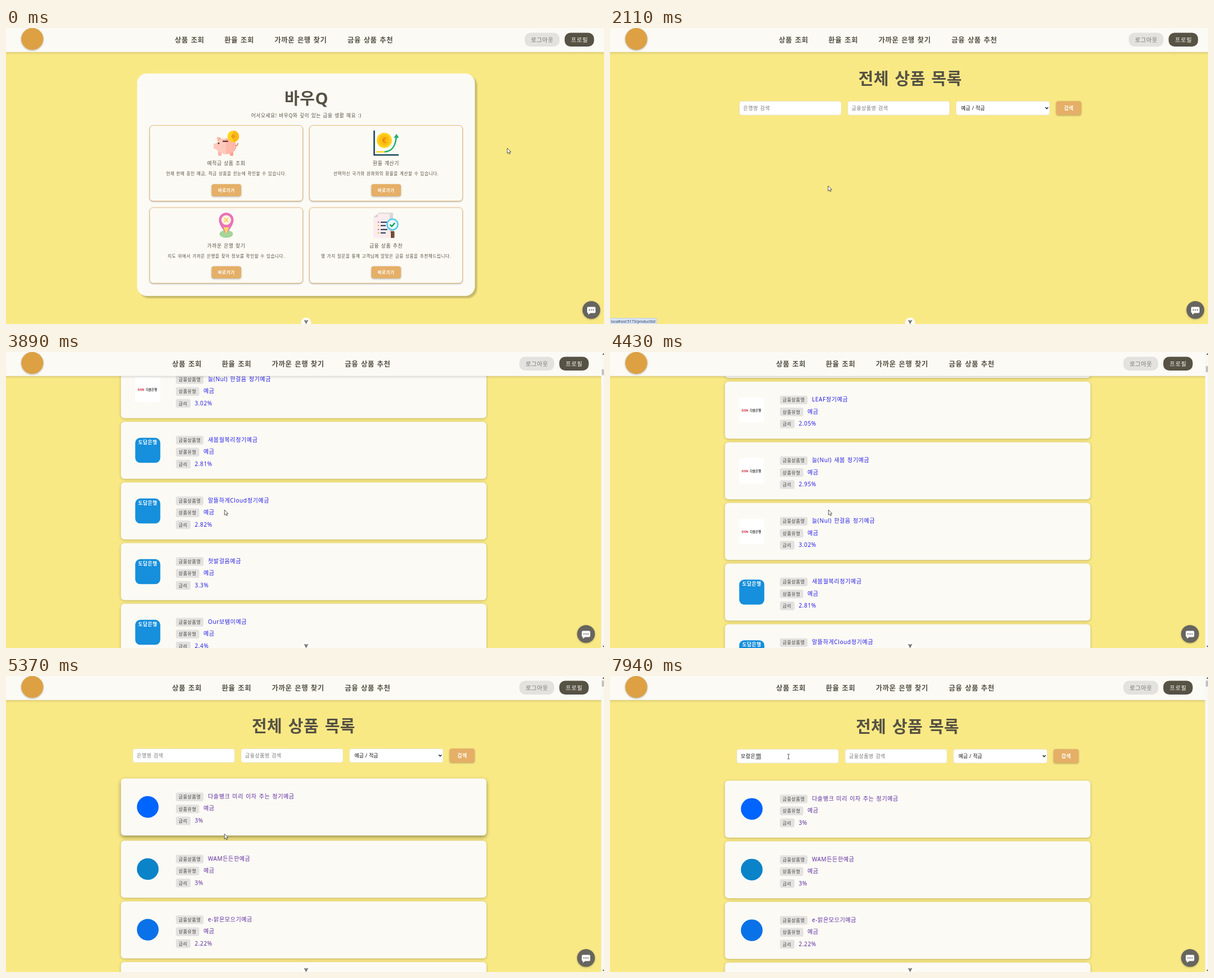
Write an HTML page that moves like this. It is 1063 px wide and 527 px high and loops after 8000 ms.

```html
<!DOCTYPE html>
<html lang="ko">
<head>
<meta charset="utf-8">
<title>금융 상품 조회</title>
<style>
  html, body { margin: 0; width: 100%; height: 100%; overflow: hidden; background: #f9e985; }
  svg { display: block; width: 100%; height: 100%; }
  text {
    font-family: "Noto Sans", "Noto Sans CJK KR", "Noto Sans CJK JP", sans-serif;
    letter-spacing: .55px; word-spacing: .08em; white-space: pre;
  }
  .tight { letter-spacing: 0; }
  .panel { filter: drop-shadow(4px 4.5px 1px rgba(0,0,0,.2)); }
  .box { filter: drop-shadow(0 1.6px 1.2px rgba(0,0,0,.3)); }
  .btn { filter: drop-shadow(0 1.6px 1.5px rgba(0,0,0,.3)); }
  .item { filter: drop-shadow(0 1.8px 2px rgba(0,0,0,.25)); }
  .bar { filter: drop-shadow(0 1.5px 2px rgba(0,0,0,.2)); }
</style>
</head>
<body>
<svg id="stage" viewBox="0 0 1063 527" xmlns="http://www.w3.org/2000/svg"></svg>
<script>
const LOOP = 8000;
const CREAM = '#fbfaf5', DARK = '#565244', SAND = '#e5af67';
const PITCH = 108, FIRST = 186.2;
const stage = document.getElementById('stage');

// y is the vertical centre of the line
const text = (x, y, s, size, fill = DARK, extra = '') =>
  `<text x="${x}" y="${(y + size * .38).toFixed(2)}" font-size="${size}" fill="${fill}" ${extra}>${s}</text>`;
const rect = (x, y, w, h, r, fill, extra = '') =>
  `<rect x="${x}" y="${y}" width="${w}" height="${h}" rx="${r}" fill="${fill}" ${extra}/>`;
const circle = (x, y, r, fill, extra = '') =>
  `<circle cx="${x}" cy="${y}" r="${r}" fill="${fill}" ${extra}/>`;
const path = (d, fill, extra = '') => `<path d="${d}" fill="${fill}" ${extra}/>`;
const line = (d, color, width, extra = '') =>
  path(d, 'none', `stroke="${color}" stroke-width="${width}" ${extra}`);
const group = (id, body, extra = '') => `<g id="${id}" ${extra}>${body}</g>`;
const MID = 'text-anchor="middle"', BOLD = 'font-weight="700"';

// Icons live in a 45 by 45 square
const pig =
  rect(8, 36, 6, 9, 1, '#ffb3a4') + rect(29, 36, 6, 9, 1, '#ff9f8f') +
  path('M6 12Q12 11 16 17L8 22Z', '#ffb3a4') +
  `<ellipse cx="22" cy="28" rx="18.5" ry="14" fill="#ffcabd"/>` +
  path('M22 14A18.5 14 0 0 1 22 42Z', '#ffb8a9') +
  rect(0, 23, 7, 10, 2, '#ffcabd') + circle(9, 23, 1.4, '#3d3436') +
  rect(16, 18, 10, 2.4, 1, '#6b3b35') +
  line('M39 27Q44 27 43 22', '#c88152', 1.5) +
  circle(35, 10.5, 10.3, '#ffd21f') + path('M35 .2a10.3 10.3 0 0 1 0 20.6Z', '#ffb914') +
  path('M35 5l4 5.5-4 5.5-4-5.5Z', '#f39a1d');

const chart =
  line('M1.5 0V43.5H45', '#17465a', 2.6) +
  line('M5 38H21', '#ffd21f', 2.4) +
  line('M20 38C34 37 40 27 41 9', '#16b06a', 2.6) +
  path('M41 6l4.5 7h-9Z', '#16b06a') +
  circle(19.5, 17.5, 13.5, '#ffd21f') + circle(19.5, 17.5, 9.5, '#ffbd12') +
  text(19.5, 17, '€', 14, '#e58a12', `${MID} ${BOLD} class="tight"`);

const pin =
  `<ellipse cx="22.5" cy="38" rx="12" ry="6.8" fill="#a2d69a"/>` +
  path('M22.5 39C18 30 9.500 23 9.500 13A13 13 0 0 1 35.500 13C35.500 23 27 30 22.500 39Z', '#e873b8') +
  path('M17.500 26H27.500L22.500 39Z', '#f8da62') +
  circle(22.5, 13, 8.6, '#fdf3df') +
  line('M19 9.500l7 7m0-7l-7 7', '#f5cf55', 1.8);

const report =
  rect(9, 0, 26, 36, 1, '#d9d7d8') +
  path('M0 8L8 2H29V45H0Z', '#fbecee') + path('M0 8L8 2V8Z', '#ddd0d4') +
  [17, 23, 30, 36].map((y, i) =>
    circle(9, y, 1.3, i % 2 ? '#f5b52e' : '#e8616f') +
    line(`M13 ${y}H${i % 2 ? 22 : 25}`, '#1d3850', 2)).join('') +
  rect(31, 33, 6.5, 12, 1, '#774b35') +
  circle(34, 21, 9.5, '#eefaff', 'stroke="#59cbe8" stroke-width="2.6"') +
  line('M29.500 21l3.300 3.300 5.500-6', '#16a667', 2.6);

const menu = (x, y, icon, name, note) => {
  const c = x + 136;
  return rect(x, y, 272, 134.5, 6, '#fcfaf4', `stroke="${SAND}" stroke-width=".8" class="box"`) +
    `<g transform="translate(${c - 22.5} ${y + 9})">${icon}</g>` +
    text(c, y + 67.5, name, 8.85, DARK, MID) +
    text(c, y + 86, note, 7.6, DARK, MID) +
    rect(c - 26, y + 104.5, 52.5, 21.5, 4, SAND, 'class="btn"') +
    text(c + .2, y + 115.3, '바로가기', 7.5, '#fff', `${MID} ${BOLD}`);
};

const home =
  rect(233, 81, 600.5, 396, 17, CREAM, 'class="panel"') +
  text(534, 125, '바우Q', 29, DARK, `${MID} ${BOLD}`) +
  text(533.7, 156, '어서오세요! 바우Q와 깊이 있는 금융 생활 해요 :)', 8.75, DARK, MID) +
  menu(255.5, 173.5, pig, '예적금 상품 조회', '현재 판매 중인 예금, 적금 상품을 한눈에 확인할 수 있습니다.') +
  menu(539.5, 173.5, chart, '환율 계산기', '선택하신 국가와 원화와의 환율을 계산할 수 있습니다.') +
  menu(255.5, 319.8, pin, '가까운 은행 찾기', '지도 위에서 가까운 은행을 찾아 정보를 확인할 수 있습니다.') +
  menu(539.5, 319.8, report, '금융 상품 추천', '몇 가지 질문을 통해 고객님께 알맞은 금융 상품을 추천해드립니다.');

const dot = color => circle(252, 50.5, 19.3, color);
const whiteTile = rect(229.7, 28.5, 44.6, 44.6, 3, '#fff') +
  text(234, 51, 'DSN', 5.6, '#c8202f', `${BOLD} class="tight"`) +
  text(248.5, 51, '다솔은행', 5.4, '#333', `${BOLD} class="tight"`);
const blueTile = rect(229.7, 28.5, 44.6, 44.6, 9, '#168fdc') +
  text(252, 36, '도담은행', 8.6, '#fff', `${MID} ${BOLD}`);

const products = [
  ['다솔뱅크 미리 이자 주는 정기예금', '3%', dot('#0064ff')],
  ['WAM든든한예금', '3%', dot('#0a83c9')],
  ['e-맑은모으기예금', '2.22%', dot('#0a72e8')],
  ['oR새거래가득예금(첫인사고객형)', '1.82%', dot('#0fc3ab')],
  ['oR새걸음예금', '2.6%', dot('#0fc3ab')],
  ['늘봄정기예금', '2.4%', whiteTile],
  ['LEAF정기예금', '2.05%', whiteTile],
  ['늘(Nul) 새봄 정기예금', '2.95%', whiteTile],
  ['늘(Nul) 한걸음 정기예금', '3.02%', whiteTile],
  ['새봄월복리정기예금', '2.81%', blueTile],
  ['알뜰하게Cloud정기예금', '2.82%', blueTile],
  ['첫발걸음예금', '3.3%', blueTile],
  ['Our보탬이예금', '2.4%', blueTile]
];

const badge = (y, w, label) =>
  rect(302, y - 7.7, w, 15.4, 3, '#e3e2e0') + text(306.8, y, label, 8, '#45423a', 'font-weight="500"');

const item = ([name, rate, mark], i) => {
  const ink = i < 4 ? '#5f2da0' : '#2a22e6';
  return `<g class="row" transform="translate(0 ${FIRST + i * PITCH})">` +
    rect(204.3, 0, 649.7, 101.5, 6, CREAM, 'class="item"') + mark +
    badge(32.7, 49, '금융상품명') + badge(54, 41.5, '상품유형') + badge(75.3, 26, '금리') +
    text(359, 31.5, name, 10.1, ink) +
    text(351, 53, '예금', 10.1, ink) +
    text(335.5, 74.7, rate, 10.1, ink) + '</g>';
};

const field = (x, w) => rect(x, 130.5, w, 24.5, 4, '#fff', 'stroke="#dcdad2" stroke-width=".6"');
const list =
  text(529, 90, '전체 상품 목록', 29, DARK, `${MID} ${BOLD}`) +
  field(225.5, 181) + field(418, 181) + field(610.5, 166.5) +
  text(232.5, 142.7, '은행명 검색', 8.9, '#757575', 'id="hint"') +
  text(232.5, 143, '', 8.9, '#111', 'id="typed"') +
  line('', '#111', .6, 'id="under"') + line('', '#111', .7, 'id="caret"') +
  text(425, 142.7, '금융상품명 검색', 8.9, '#757575') +
  text(619.5, 142.7, '예금 / 적금', 8.9, '#111', 'class="tight"') +
  line('M769.300 141.200l2.500 2.600 2.500-2.600', '#111', 1.3) +
  rect(788.5, 130.3, 44.5, 24.7, 4, SAND, 'class="btn"') +
  text(811, 143, '검색', 8.9, '#fff', `${MID} ${BOLD}`) +
  group('rows', products.map(item).join(''));

const nav = [[300, '상품 조회'], [388.3, '환율 조회'], [477.3, '가까운 은행 찾기'], [607, '금융 상품 추천']]
  .map(([x, s]) => text(x, 21, s, 12.4, DARK, BOLD)).join('');

const account =
  rect(922, 8.5, 62, 24.5, 10.5, '#e3e2df') + text(953.2, 20.8, '로그아웃', 10.3, '#77756d', MID) +
  rect(993, 8.5, 52.3, 24.5, 10.5, DARK) + text(1019.4, 20.8, '프로필', 10.3, '#f3f1ea', MID);

const chat = circle(1040.5, 502, 15.8, '#66655f', 'class="btn"') +
  path('M1035 496.500h11q2 0 2 2v7q0 2-2 2h-7l-4 3v-3q-2 0-2-2v-7q0-2 2-2Z', '#fff') +
  [1037, 1040.5, 1044].map(x => circle(x, 502, 1.1, '#55544e')).join('');

const scrollbar = rect(1058, 0, 5, 527, 0, '#f8f8f7') +
  path('M1060 5l3-3.500V5Z', '#555') + path('M1060 523h3v3Z', '#555') +
  rect(1059, 0, 4, 10.5, 0, '#c1c1c1', 'id="thumb"');

const status = rect(-1, 516.8, 84.3, 12, 1.5, '#d6e4fb', 'stroke="#a9b8d2" stroke-width=".5"') +
  text(1.8, 522.4, 'localhost:5173/productlist', 6.5, '#33383f', 'class="tight"');

stage.innerHTML =
  rect(0, 0, 1063, 527, 0, '#f9e985') +
  group('home', home) + group('list', list) +
  rect(-8, -8, 1080, 50.8, 0, CREAM, 'class="bar"') +
  circle(46.7, 19.5, 19.6, '#dda144', 'class="btn"') +
  group('nav', nav) + group('account', account) + group('chat', chat) +
  group('scrollbar', scrollbar) + group('status', status) +
  circle(533.5, 524.5, 9, '#fdfdfb') +
  path('M529.500 519.500l4 1.500 4-1.500-4 8Z', '#777') +
  group('arrow', path('M0 0V9.300L2.200 7.300 3.700 10.500 5.200 9.800 3.800 6.800H6.700Z', '#fff',
    'stroke="#222" stroke-width=".75"')) +
  group('beam', line('M-2-4.200H-.5L0-3.700 .5-4.200H2M0-3.700V3.700M-2 4.200H-.5L0 3.700 .5 4.200H2', '#222', .8));

const el = {};
stage.querySelectorAll('[id]').forEach(n => el[n.id] = n);
const firstRow = stage.querySelector('.row'), firstCard = firstRow.querySelector('.item');

const scrollKeys = [[2800, 0], [2990, 61.6], [3130, 320], [3310, 320], [3550, 680], [3720, 680],
  [3890, 1033.7], [3960, 1050], [4180, 1050], [4430, 782.5], [4700, 520], [4870, 520],
  [5060, 240], [5250, 40], [5370, 1], [5440, 0]];
const hoverKeys = [[2310, 0], [2500, 1], [3010, 1], [3130, 0], [5130, 0], [5330, 1], [5560, 1], [5800, 0]];
const xKeys = [[5440, 388.3], [5640, 342], [5850, 311], [5990, 317.3]];
const yKeys = [[5440, 281], [5640, 166], [5850, 143.5]];
const typing = [[6940, 'ㅁ'], [7050, '모'], [7150, '모라'], [7260, '모람'], [7360, '모람으'],
  [7460, '모람으해'], [7560, '모람으해ㅇ'], [7670, '모람으'], [7800, '모람은'],
  [7870, '모람은해'], [7940, '모람은행']];

function at(keys, t) {
  const i = keys.findIndex(k => k[0] > t);
  if (i === 0) return keys[0][1];
  if (i < 0) return keys[keys.length - 1][1];
  const [t0, a] = keys[i - 1], [t1, b] = keys[i];
  return a + (b - a) * (t - t0) / (t1 - t0);
}
const show = (node, on) => node.setAttribute('display', on ? 'inline' : 'none');
const move = (node, x, y) => node.setAttribute('transform', `translate(${x} ${y})`);

function drawPointer(t) {
  const p = Math.min(1, Math.max(0, (t - 940) / 830)), e = p * p * (3 - 2 * p);
  let x = 891 - 503.3 * e, y = 214 + 67 * e;
  if (t >= 2310) { x = at(xKeys, t); y = at(yKeys, t); }
  const beam = t > 5700;
  show(el.arrow, !beam);
  show(el.beam, beam);
  move(beam ? el.beam : el.arrow, x, y);
}

function drawInput(t) {
  const last = typing.filter(k => k[0] <= t).pop();
  const word = last ? last[1] : '';
  show(el.hint, !word);
  if (el.typed.textContent !== word) el.typed.textContent = word;
  const end = 232.5 + (word ? el.typed.getComputedTextLength() : 0);
  const start = end - (word ? el.typed.getSubStringLength(word.length - 1, 1) : 0);
  el.under.setAttribute('d', word ? `M${start} 148H${end}` : '');
  el.caret.setAttribute('d', t >= 6390 ? `M${end + .2} 138V148` : '');
}

function draw(t) {
  const listed = t >= 1930, loaded = t >= 2310;
  const scroll = at(scrollKeys, t), hover = at(hoverKeys, t);
  show(el.home, !listed);
  show(el.list, listed);
  show(el.rows, loaded);
  show(el.scrollbar, loaded);
  show(el.status, t >= 1700 && t < 2450);
  move(el.list, loaded ? 0 : 4.6, -scroll);
  move(el.nav, loaded ? -4.7 : 0, 0);
  move(el.account, loaded ? -9.5 : 0, 0);
  move(el.chat, loaded ? -9.5 : 0, 0);
  move(el.thumb, 0, 8.3 + scroll * .0217);
  move(firstRow, 0, FIRST - 2.6 * hover);
  firstCard.style.filter =
    `drop-shadow(0 ${1.8 + 1.8 * hover}px ${2 + 1.5 * hover}px rgba(0,0,0,${.25 + .15 * hover}))`;
  drawInput(t);
  drawPointer(t);
}

const began = performance.now();
function tick() {
  draw((performance.now() - began) % LOOP);
  requestAnimationFrame(tick);
}
tick();
</script>
</body>
</html>
```
